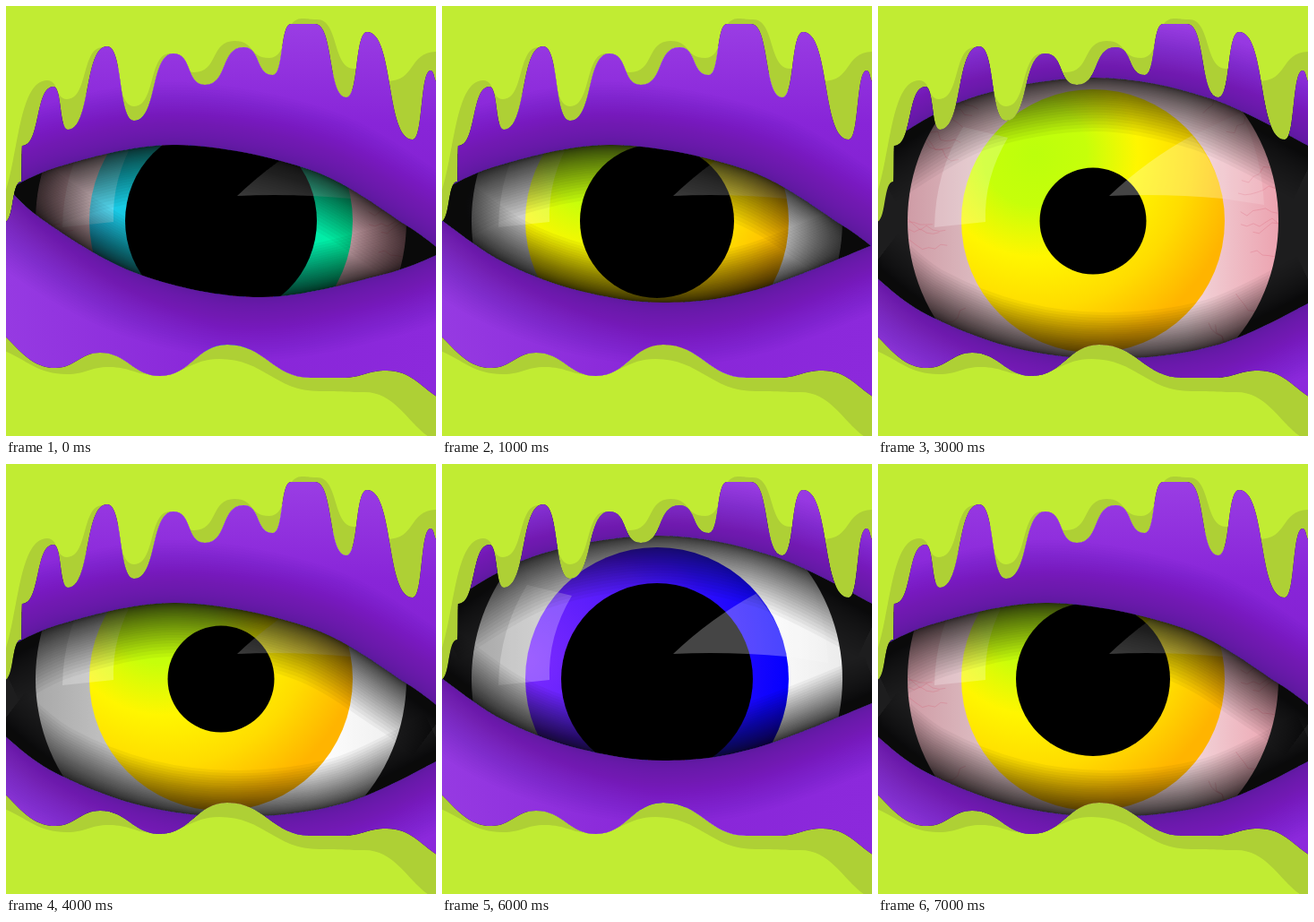
These frames come from a looping animation (480x480 px, 8000 ms). An HTML page with a canvas:

```html
<!DOCTYPE html>
<html>
<head>
<meta charset="utf-8">
<style>
html, body { margin: 0; width: 100%; height: 100%; overflow: hidden; background: #c1ec33; }
canvas { display: block; width: 480px; height: 480px; }
</style>
</head>
<body>
<canvas id="stage" width="480" height="480"></canvas>
<script>
const ctx = document.getElementById('stage').getContext('2d');
const STEP = 1000, MID = 240, IRIS = 147, BALL = 207;

const points = text => text.trim().split(/\s+/).map(p => p.split(',').map(Number));

// Drips: each crest rolls into the next trough with level tangents.
function wave(pts, ease) {
  const path = new Path2D();
  path.moveTo(...pts[0]);
  pts.slice(1).forEach(([x, y], i) => {
    const [px, py] = pts[i], pull = ease * (x - px);
    path.bezierCurveTo(px + pull, py, x - pull, y, x, y);
  });
  return path;
}

// Lid edges: a smooth curve through a few key points.
function spline(pts) {
  const path = new Path2D();
  path.moveTo(...pts[0]);
  for (let i = 0; i < pts.length - 1; i++) {
    const a = pts[i - 1] || pts[i], b = pts[i], c = pts[i + 1], d = pts[i + 2] || c;
    path.bezierCurveTo(b[0] + (c[0] - a[0]) / 6, b[1] + (c[1] - a[1]) / 6,
      c[0] - (d[0] - b[0]) / 6, c[1] - (d[1] - b[1]) / 6, ...c);
  }
  return path;
}

// The area between an edge and a level line beyond it.
function area(edge, far) {
  const path = new Path2D(edge);
  path.lineTo(520, far);
  path.lineTo(-40, far);
  path.closePath();
  return path;
}

const drips = wave(points(`-2,241 17,196 18,156 53,90 69,138 113,45 143,128 187,53 222,88
  265,46 298,77 318,20 345,20 380,102 403,29 454,149 474,72 482,85`), .6);
const dripShade = wave(points(`-25,235 46,83 68,104 108,46 143,112 183,53 210,74
  255,39 294,58 330,14 347,15 389,70 425,84 482,51`), .6);
const slime = wave(points('-40,350 55,404 105,387 172,413 247,378 340,415 375,415 425,407 510,445'), .45);
const slimeShade = wave(points('-30,380 68,411 115,403 168,412 238,394 350,430 400,431 500,490'), .45);

const lid = (far, keys) => {
  const edge = spline(points(keys));
  return { edge, area: area(edge, far) };
};
const uppers = {
  half: lid(-40, '-10,212 60,179 190,155 340,183 447,245 490,277'),
  open: lid(-40, '-10,166 100,104 240,80 370,103 490,161')
};
const lowers = {
  tight: lid(520, '-10,189 40,238 150,300 285,325 420,300 490,274'),
  mid: lid(520, '-10,232 65,284 150,317 247,331 350,317 490,263'),
  open: lid(520, '-10,296 50,342 150,381 260,394 380,378 490,327')
};

const irises = {
  lagoon: { x: 93, y: 240, r: 294, colors: ['#1fc4ee', '#06dcc8', '#00f29e'] },
  jade: { x: 93, y: 240, r: 294, colors: ['#10e3c6', '#05e594', '#00e05a'] },
  citrus: { x: 175, y: 165, r: 230, colors: ['#bcff0c', '#c6ff0a', '#fff600', '#ffdc00', '#ffb400'] },
  violet: { x: 93, y: 220, r: 294, colors: ['#7d2bff', '#4c17fa', '#0500ff'] }
};
const scleras = {
  white: ['#a8a8a8', '#c8c8c8', '#e0e0e0', '#ffffff', '#ececec'],
  pink: ['#cf9ca6', '#e0c4c8', '#e8d0d4', '#f2d8dc', '#eca3b0']
};

const looks = [
  ['half', 'tight', 'lagoon', 'pink', 107],
  ['half', 'mid', 'citrus', 'white', 86],
  ['half', 'mid', 'jade', 'white', 107],
  ['open', 'open', 'citrus', 'pink', 59.5],
  ['half', 'open', 'citrus', 'white', 59.5],
  ['half', 'open', 'citrus', 'pink', 107],
  ['open', 'mid', 'violet', 'white', 107],
  ['half', 'open', 'citrus', 'pink', 86]
];

function withStops(gradient, colors) {
  colors.forEach((c, i) => gradient.addColorStop(i / (colors.length - 1), c));
  return gradient;
}
const across = (x0, x1, colors) => withStops(ctx.createLinearGradient(x0, 0, x1, 0), colors);
const down = (y0, y1, colors) => withStops(ctx.createLinearGradient(0, y0, 0, y1), colors);
const around = ({ x, y, r, colors }) => withStops(ctx.createRadialGradient(x, y, 0, x, y, r), colors);

function fill(path, style) {
  ctx.fillStyle = style;
  ctx.fill(path);
}

function flood(style) {
  ctx.fillStyle = style;
  ctx.fillRect(0, 0, 480, 480);
}

function disc(radius, style) {
  const path = new Path2D();
  path.arc(MID, MID, radius, 0, Math.PI * 2);
  fill(path, style);
}

// Soft darkness that falls off away from an edge.
function fade(edge, color, reach, alpha, power) {
  const layers = 40;
  ctx.save();
  ctx.strokeStyle = color;
  ctx.globalAlpha = alpha;
  for (let i = 1; i <= layers; i++) {
    ctx.lineWidth = 2 * reach * (i / layers) ** power;
    ctx.stroke(edge);
  }
  ctx.restore();
}

function veins() {
  let seed = 11;
  const rand = () => (seed = seed * 16807 % 2147483647) / 2147483647;
  ctx.strokeStyle = 'rgba(215,85,110,.25)';
  ctx.lineWidth = 1;
  for (let i = 0; i < 22; i++) {
    let angle = (i % 2) * Math.PI + (rand() - .5) * 1.5;
    const end = 160 + rand() * 20;
    ctx.beginPath();
    for (let r = BALL; r > end; r -= 7) {
      ctx.lineTo(MID + r * Math.cos(angle), MID + r * Math.sin(angle));
      angle += (rand() - .5) * .07;
    }
    ctx.stroke();
  }
}

const glint = new Path2D('M63 247Q64 185 95 135L145 147Q118 192 120 241Z');
const beam = new Path2D('M258 212Q300 172 350 145Q378 176 385 215Q320 209 258 212Z');
const beamTail = new Path2D('M350 145L405 119Q428 165 431 222L385 215Q378 176 350 145Z');

function drawEye(iris, sclera, pupil) {
  flood('#1d1d1e');
  disc(BALL, across(MID - BALL, MID + BALL, scleras[sclera]));
  if (sclera === 'pink') veins();
  disc(IRIS, around(irises[iris]));
  disc(pupil, '#000');
  fill(glint, 'rgba(255,255,255,.25)');
  fill(beam, 'rgba(255,255,255,.27)');
  fill(beamTail, 'rgba(255,255,255,.14)');
}

function drawLid({ edge, area }, skin) {
  ctx.save();
  ctx.clip(area);
  flood(skin);
  fade(edge, '#2b0656', 70, .02, 1.7);
  ctx.restore();
}

function draw([upperName, lowerName, iris, sclera, pupil]) {
  const upper = uppers[upperName], lower = lowers[lowerName];
  flood('#c1ec33');
  ctx.save();
  ctx.clip(area(dripShade, 520));
  ctx.clip(area(slimeShade, -40));
  flood('#aed035');
  ctx.restore();

  ctx.save();
  ctx.clip(area(drips, 520));
  ctx.clip(area(slime, -40));
  drawEye(iris, sclera, pupil);
  fade(upper.edge, '#000', 60, .047, 2.7);
  fade(lower.edge, '#000', 52, .047, 2.5);
  drawLid(lower, across(0, 480, ['#963ae2', '#8826d8', '#8c29dc']));
  drawLid(upper, down(20, 240, ['#9a3de4', '#8825d8', '#8220d0']));
  ctx.restore();
}

let shown = -1;
function tick() {
  const index = Math.floor(performance.now() / STEP) % looks.length;
  if (index !== shown) draw(looks[shown = index]);
  requestAnimationFrame(tick);
}
tick();
</script>
</body>
</html>
```
